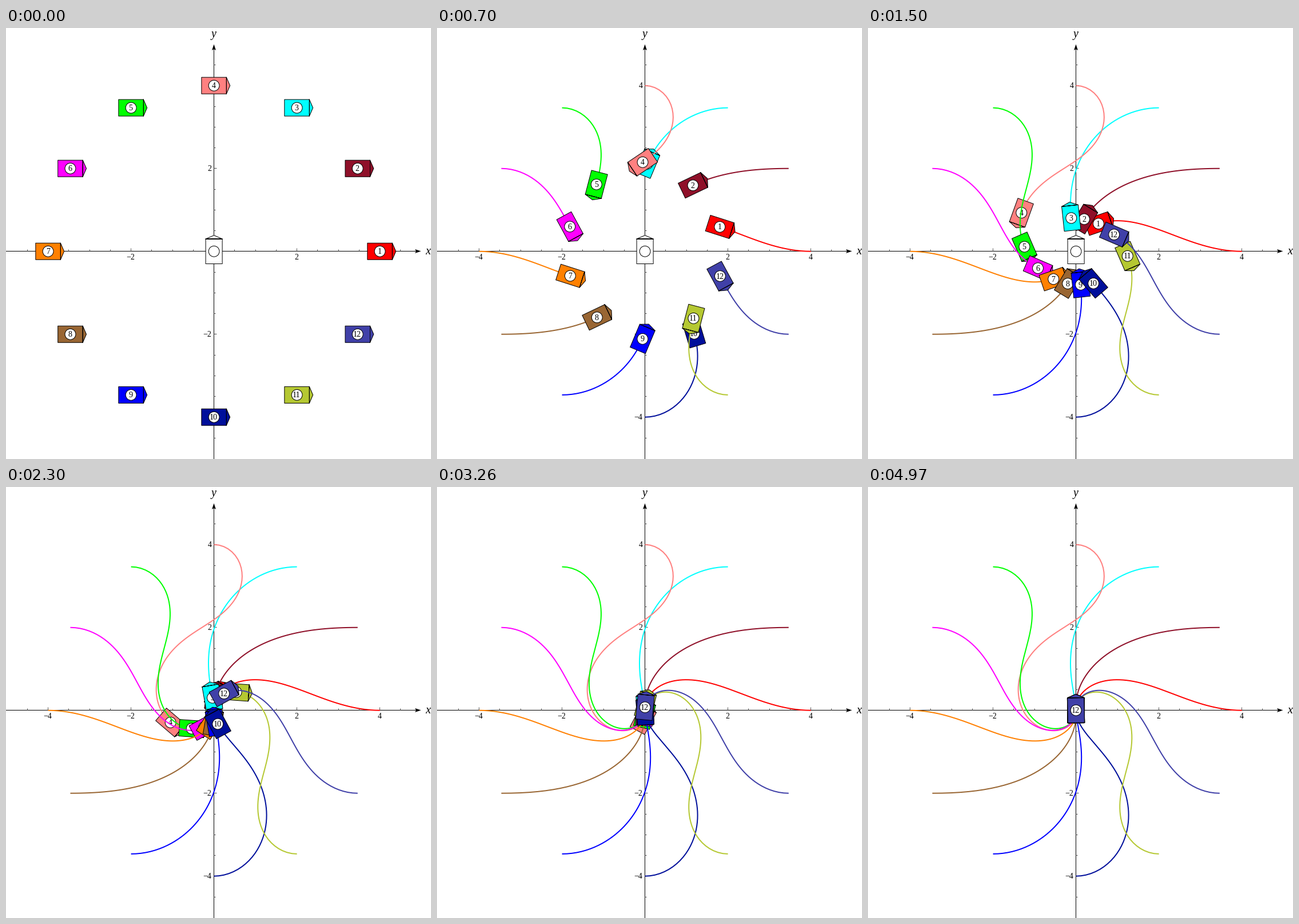
A matplotlib script that plays this animation: 743x754 px, repeating every 5000 ms.

```python
import numpy as np
import matplotlib.pyplot as plt
from matplotlib.animation import FuncAnimation
from matplotlib.patches import Circle, Polygon

W, H, DPI = 743, 754, 64
UNIT = 72.5                # pixels per axis unit
OX, OY = 363.6, 390.75     # origin in pixels
AX, AY = 363.5, 390.5      # axis lines on whole pixels
PT = 72 / DPI              # points per pixel
K_ALPHA, K_BETA = 2.5, 0.95
STEPS = 4                  # integration steps per picture
DT = 0.061 / STEPS
FAST, SLOW_MS, FAST_MS = 46, 50, 30
PICTURES = 136

COLORS = ["#ff0000", "#8f1029", "#00ffff", "#ff8080", "#00ff00", "#ff00ff",
          "#ff8000", "#996633", "#0000ff", "#000f9b", "#b5c832", "#4040a8"]

plt.rcParams["font.family"] = "Liberation Serif"


def rates(state):
    """Polar pose control: distance, goal angle, approach angle."""
    rho, alpha, beta = state
    s = np.sin(alpha)
    return np.array([-rho * np.cos(alpha), s - K_ALPHA * alpha + K_BETA * beta, -s])


def simulate():
    phi = np.arange(12) * np.pi / 6
    forward = np.cos(phi) < 1e-9
    psi = np.where(forward, phi - np.pi, (phi + np.pi) % (2 * np.pi) - np.pi)
    state = np.array([np.full(12, 4.0), psi, np.pi / 2 - psi])
    states = [state]
    for _ in range(STEPS * PICTURES):
        k1 = rates(state)
        k2 = rates(state + DT / 2 * k1)
        k3 = rates(state + DT / 2 * k2)
        k4 = rates(state + DT * k3)
        state = state + DT / 6 * (k1 + 2 * k2 + 2 * k3 + k4)
        states.append(state)
    rho, alpha, beta = np.array(states).transpose(1, 0, 2)
    angle = np.pi / 2 - beta + np.pi * forward
    return rho * np.cos(angle), rho * np.sin(angle), np.pi / 2 - beta - alpha


X, Y, HEADING = simulate()

fig = plt.figure(figsize=(W / DPI, H / DPI), dpi=DPI, facecolor="white")
ax = fig.add_axes([0, 0, 1, 1])
ax.set_xlim(-OX / UNIT, (W - OX) / UNIT)
ax.set_ylim((OY - H) / UNIT, OY / UNIT)
ax.axis("off")


def px(x, y):
    return (x - OX) / UNIT, (OY - y) / UNIT


def segment(p, q, color="black"):
    (x0, y0), (x1, y1) = px(*p), px(*q)
    ax.plot([x0, x1], [y0, y1], color=color, lw=PT, zorder=0, snap=False,
            solid_capstyle="butt")


def label(x, y, text, size=14, **kw):
    kw = {"ha": "center", "va": "baseline", "zorder": 0, **kw}
    return ax.text(x, y, text, fontsize=size * PT, **kw)


def draw_axes():
    segment((0, AY), (718, AY))
    segment((AX, H), (AX, 36))
    for tip in ([(725.5, AY), (715, AY - 3.5), (717, AY), (715, AY + 3.5)],
                [(AX, 28.5), (AX - 3.5, 39), (AX, 37), (AX + 3.5, 39)]):
        ax.add_patch(Polygon([px(*p) for p in tip], fc="black", lw=0, zorder=0))
    for i in range(-9, 10):
        if i == 0:
            continue
        major = i % 4 == 0
        size = 5 if major else 3
        x = np.floor(OX + i * UNIT / 2) + 0.5
        y = np.floor(OY - i * UNIT / 2) + 0.5
        segment((x, AY), (x, AY - size), "#555555")
        segment((AX, y), (AX + size, y), "#555555")
        if major:
            text = str(i // 2).replace("-", "\u2212")
            label(*px(x - 0.5, 405.5), text)
            label(*px(359.5, y + 4.2), text, ha="right")
    label(*px(737.5, 395.8), "x", 20, style="italic")
    label(*px(363.5, 16.3), "y", 20, style="italic")


L, B, TIP = 0.3, 0.2, 0.3866
SHAPE = np.array([(-L, B), (L, B), (TIP, 0), (L, -B), (L, B), (L, -B), (-L, -B)])


class Car:
    def __init__(self, color, name, z):
        self.trail, = ax.plot([], [], color=color, lw=2 * PT, zorder=z,
                              solid_capstyle="butt")
        style = dict(ec="black", lw=PT, zorder=z)
        self.body = ax.add_patch(Polygon(SHAPE, fc=color, joinstyle="round", **style))
        self.disc = ax.add_patch(Circle((0, 0), 0.13, fc="white", **style))
        self.name = label(0, 0, name, zorder=z)

    def pose(self, x, y, heading):
        c, s = np.cos(heading), np.sin(heading)
        self.body.set_xy(SHAPE @ np.array([[c, s], [-s, c]]) + (x, y))
        self.disc.center = x, y
        self.name.set_position((x - 0.5 / UNIT, y - 4.5 / UNIT))


draw_axes()
Car("white", "", 1).pose(0, 0, np.pi / 2)
cars = [Car(color, str(i + 1), i + 2) for i, color in enumerate(COLORS)]


def update(tick):
    ms = tick * 10
    switch = FAST * SLOW_MS
    n = ms // SLOW_MS if ms < switch else FAST + (ms - switch) // FAST_MS
    k = max(0, STEPS * n - STEPS // 2)
    for i, car in enumerate(cars):
        car.trail.set_data(X[:k + 1:2, i], Y[:k + 1:2, i])
        car.pose(X[k, i], Y[k, i], HEADING[k, i])
    return []


anim = FuncAnimation(fig, update, frames=500, interval=10, repeat=True,
                     repeat_delay=0, init_func=lambda: update(0))
plt.show()
```
